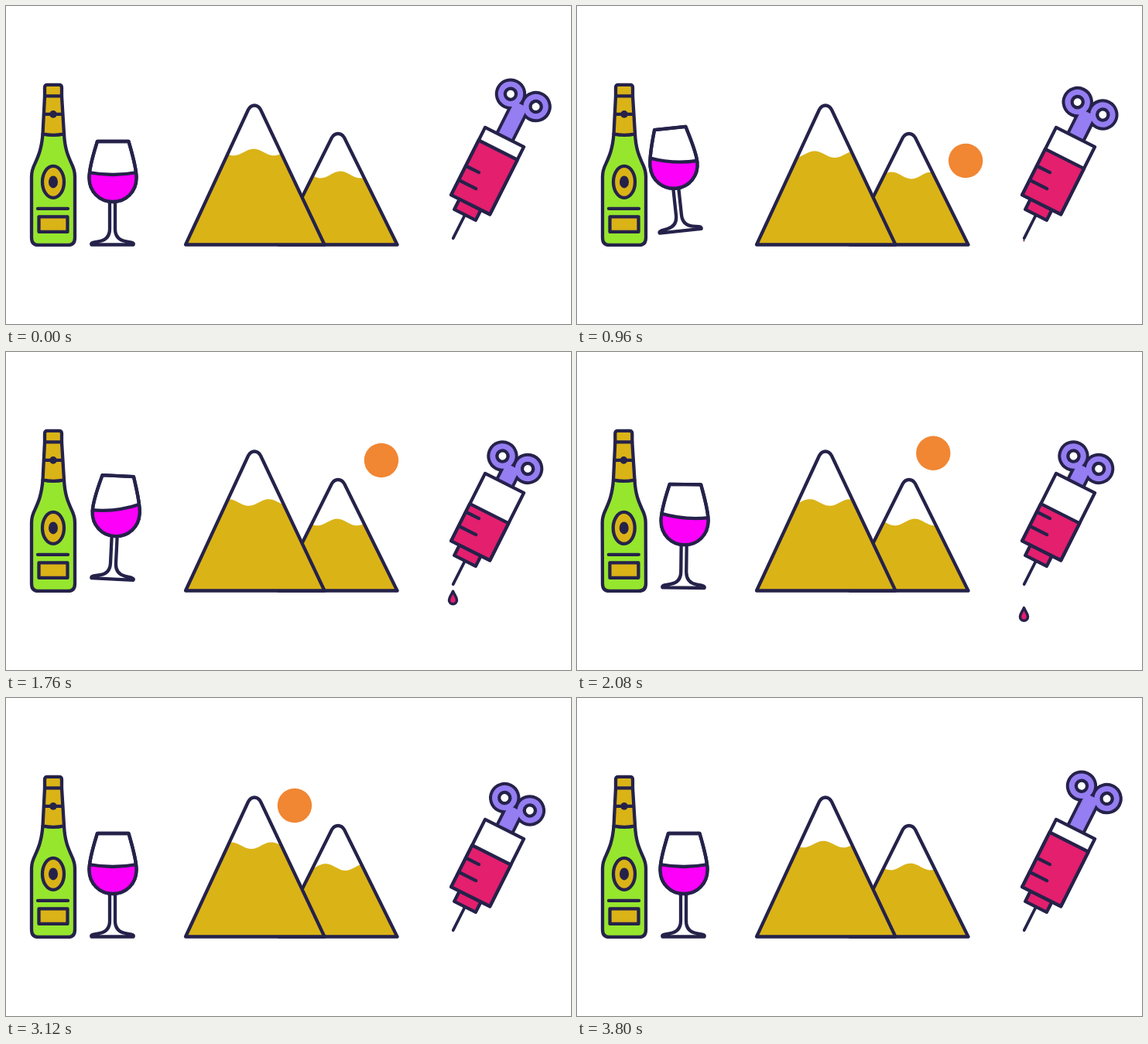
Animation, 730 px wide and 411 px high, one loop 3.84 s. Source, as an HTML page:

```html
<!DOCTYPE html>
<html lang="en">
<head>
<meta charset="utf-8">
<title>Bottle, mountains, syringe</title>
<style>
  html, body { margin: 0; width: 100%; height: 100%; overflow: hidden; background: #fff; }
  svg { display: block; width: 730px; height: 411px; }
  .ink { stroke: #25224a; stroke-width: 4.3; stroke-linecap: round; stroke-linejoin: round; fill: none; }
  .ink .dot { fill: #25224a; stroke: none; }
  .gold { fill: #dab317; }
  .green { fill: #96e62e; }
  .red { fill: #e31f6e; }
  .white { fill: #fff; }
  .wine { fill: #fc00fa; }
  .rim { fill: #25224a; stroke: #25224a; stroke-width: 8; stroke-linejoin: round; }
  .grip { fill: #957df2; }
</style>
</head>
<body>
<svg viewBox="0 0 730 411">
  <defs>
    <path id="peakA" d="M232 308.500L313 134Q316 128.500 321 128.500Q326 128.500 329 134L411.500 308.500Z"/>
    <path id="peakB" d="M352 308.500L421 170Q424 165 429 165Q434 165 437 170L505.500 308.500Z"/>
    <path id="bowl" d="M118 175H158.500C162 188 168.500 208 168.500 222C168.500 240 155 253 138 253C121 253 107.500 240 107.500 222C107.500 208 114 188 118 175Z"/>
    <path id="neck" d="M50 116V105Q50 101.500 53.500 101.500H68.500Q72 101.500 72 105V116L75 165Q61 168 47.500 165Z"/>
    <g id="handle">
      <circle cx="-17" cy="-200" r="16.200"/>
      <circle cx="19.500" cy="-200" r="16.200"/>
      <path d="M-8 -194H10.500V-130H-8Z"/>
    </g>
    <clipPath id="inA"><use href="#peakA"/></clipPath>
    <clipPath id="inB"><use href="#peakB"/></clipPath>
    <clipPath id="inBowl"><use href="#bowl"/></clipPath>
  </defs>

  <g id="bottle" class="ink">
    <path class="green" d="M47.500 165C46 184 42 193 37.500 203Q33 212 33 220V299Q33 308.500 42 308.500H80Q89 308.500 89 299V220Q89 212 84.500 203C80 193 76 184 75 165Z"/>
    <use href="#neck" class="gold"/>
    <path d="M50 116H72M49 139.500H73M41 261.500H80"/>
    <circle class="dot" cx="61" cy="139.500" r="4.800"/>
    <ellipse class="gold" cx="61" cy="227" rx="14" ry="20.500"/>
    <ellipse class="dot" cx="61" cy="227" rx="6" ry="8"/>
    <rect class="gold" x="42.500" y="272" width="37" height="19.500"/>
  </g>

  <g id="glass" class="ink">
    <path class="white" d="M134 252V288C134 298 129 302.500 121 304L113 305.500Q109.500 306.500 110.500 308.500H164.500Q165.500 306.500 162 305.500L154 304C146 302.500 141 298 141 288V252Z"/>
    <use href="#bowl" class="white"/>
    <path id="wine" class="wine" clip-path="url(#inBowl)"/>
    <use href="#bowl"/>
  </g>

  <circle id="sun" r="22.200" fill="#f18633"/>
  <g class="ink">
    <use href="#peakB" class="white" stroke="none"/>
    <g clip-path="url(#inB)"><path id="snowB" class="gold" stroke="none"/></g>
    <use href="#peakB"/>
    <use href="#peakA" class="white" stroke="none"/>
    <g clip-path="url(#inA)"><path id="snowA" class="gold" stroke="none"/></g>
    <use href="#peakA"/>
  </g>

  <g id="drop" class="ink">
    <path class="red" stroke-width="3.500" d="M0 1C2 6 5 8.500 5 12.500A5 5 0 0 1 -5 12.500C-5 8.500 -2 6 0 1Z"/>
  </g>
  <g transform="translate(577.300 300) rotate(26.700)">
    <g id="plunger">
      <use href="#handle" class="rim"/>
      <use href="#handle" class="grip"/>
      <g class="ink">
        <circle class="white" cx="-17" cy="-200" r="7.100"/>
        <circle class="white" cx="19.500" cy="-200" r="7.100"/>
      </g>
    </g>
    <g class="ink">
      <path d="M.5 -33V0" stroke-width="3.800"/>
      <path class="red" d="M-15 -49H16V-34H-15Z"/>
      <path class="white" d="M-27 -146.600H29V-49H-27Z"/>
      <path id="serum" class="red"/>
      <path d="M-25 -91H-8M-25 -70.500H-2"/>
    </g>
  </g>
</svg>
<script>
const LOOP = 3840;
const $ = id => document.getElementById(id);
const set = (id, name, value) => $(id).setAttribute(name, value);
const clamp = p => Math.min(1, Math.max(0, p));
const smooth = p => p * p * (3 - 2 * p);

// Rows of [time, ...values]; every row is a brief stop.
const glassKeys = [[0, 0, 0, 0], [160, 0, 0, 0], [640, -2, -14, 2.3],
  [1120, -4.5, -19, -9], [1760, 0, -15, 2.8], [2240, 0, 0, 0]];
const wineKeys = [[0, 0], [160, 0], [640, -3], [1280, 13.5], [1760, -5.5], [2100, 2.5], [2400, 0]];
const bottleKeys = [[0, 0], [1140, 0], [1300, -2.3], [1760, 0], [1920, -0.8], [2160, 0]];
const plungerKeys = [[0, 0], [320, 0], [1600, 23.3], [2880, 23.3], [3600, 0]];
const sunKeys = [[0, 455, 272], [640, 492, 226], [1280, 505, 174], [1760, 485, 140],
  [2480, 426, 127], [3120, 373, 139], [LOOP, 322, 182]];

function segment(keys, t) {
  let i = 0;
  while (i < keys.length - 2 && t >= keys[i + 1][0]) i++;
  const a = keys[i], b = keys[i + 1];
  return { i, a, b, p: clamp((t - a[0]) / (b[0] - a[0])) };
}

function eased(keys, t) {
  const { a, b, p } = segment(keys, t);
  return a.slice(1).map((v, k) => v + (b[k + 1] - v) * smooth(p));
}

// Smooth curve that keeps its speed through the keys.
function flowing(keys, t) {
  const { i, a, b, p } = segment(keys, t);
  const slope = (j, k) => {
    const l = keys[Math.max(0, j - 1)], r = keys[Math.min(keys.length - 1, j + 1)];
    return (r[k] - l[k]) / (r[0] - l[0]);
  };
  const d = b[0] - a[0], q = 1 - p;
  return [1, 2].map(k => a[k] + (b[k] - a[k]) * smooth(p)
    + d * p * q * (q * slope(i, k) - p * slope(i + 1, k)));
}

function snow(left, right, crest, length, y, height) {
  let d = `M${left} 309`;
  for (let x = left; x <= right; x += 2)
    d += `L${x} ${(y - height * Math.cos((x - crest) / length * 2 * Math.PI)).toFixed(2)}`;
  return d + `L${right} 309Z`;
}

function draw(t) {
  const [gx, gy, turn] = eased(glassKeys, t);
  set('glass', 'transform', `translate(${gx} ${gy}) rotate(${turn} 137.500 308)`);
  const [s] = eased(wineKeys, t);
  const sag = 221 + Math.abs(s) * 0.25;
  set('wine', 'd', `M106 ${215 - s}Q138 ${sag} 170 ${215 + s}V260H106Z`);
  set('bottle', 'transform', `translate(0 .4) rotate(${eased(bottleKeys, t)[0]} 61 310)`);

  const [sx, sy] = flowing(sunKeys, t);
  set('sun', 'cx', sx);
  set('sun', 'cy', sy);

  const turns = t / LOOP, sink = Math.cos(turns * 2 * Math.PI);
  set('snowA', 'd', snow(230, 414, 320 + 3 * 52 * turns, 52, 191.8 - 2.8 * sink, 4.3));
  set('snowB', 'd', snow(350, 508, 432 + 2 * 51 * turns, 51, 219 - sink, 4.4));

  const [push] = eased(plungerKeys, t);
  set('plunger', 'transform', `translate(0 ${push})`);
  set('serum', 'd', `M-27 ${push * 1.09 - 128}H29V-49H-27Z`);

  const size = clamp((t - 880) / 540);
  const fall = 42 * clamp((t - 1560) / 680) ** 1.5;
  set('drop', 'transform', `translate(577.500 ${301.5 + fall}) scale(${size})`);
  set('drop', 'opacity', size ? clamp((2260 - t) / 160) : 0);
}

const start = performance.now();
function tick(now) {
  draw(Math.max(0, now - start) % LOOP);
  requestAnimationFrame(tick);
}
draw(0);
requestAnimationFrame(tick);
</script>
</body>
</html>
```
